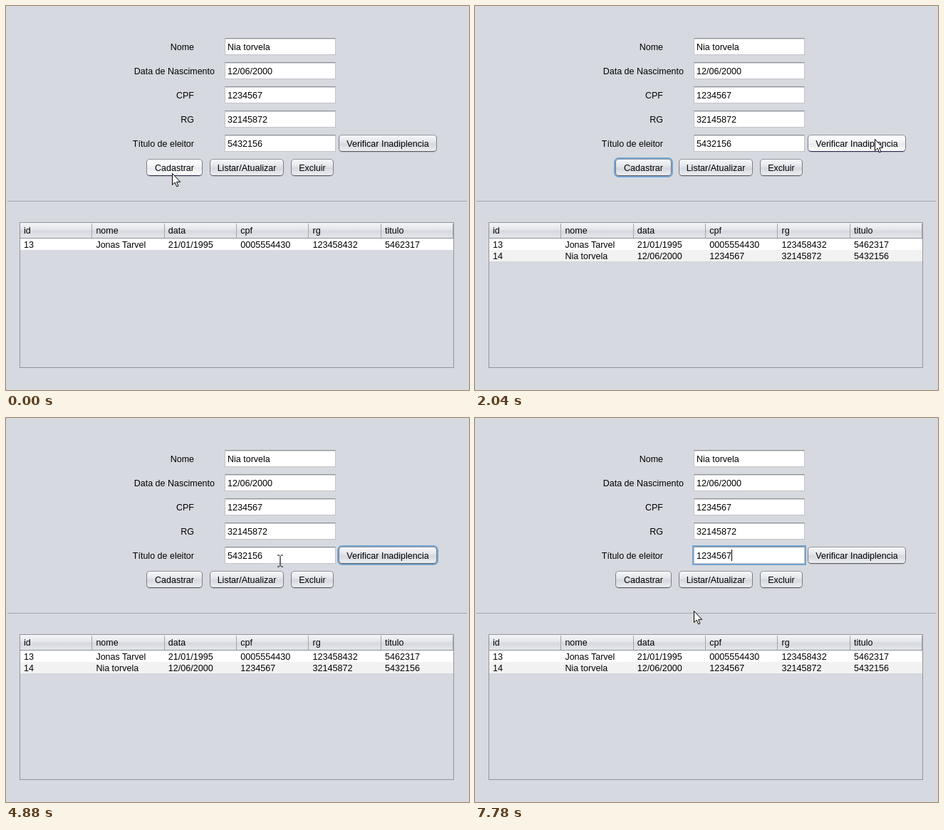
An HTML page for the animation above (8 s loop, 650 by 540 pixels).

```html
<!DOCTYPE html>
<html lang="pt">
<head>
<meta charset="utf-8">
<style>
html, body { margin: 0; width: 100%; height: 100%; overflow: hidden; background: #d6d9df; }
body { font: 12.5px/16px "Liberation Sans", Arial, sans-serif; color: #000; }
#stage { position: absolute; left: 0; top: 0; width: 650px; height: 540px; overflow: hidden; }
#stage div, svg { position: absolute; box-sizing: border-box; white-space: pre; }
.num { font-size: 12.6px; }
.right { text-align: right; }
.field { background: #fff; border: 1px solid #c0c3c9; border-top-color: #8d8f94; box-shadow: inset 0 1px #d8d9dc; }
.button {
  padding-top: 4px; text-align: center;
  border: 1px solid; border-color: #94979e #7b7e86 #5a5c63; border-radius: 5px;
  background: linear-gradient(#f7f8fa, #e2e4e9 45%, #d5d8de 55%, #eceef1);
  box-shadow: 0 1px #b9bcc3;
}
.hover { background: linear-gradient(#fff, #f1f2f5 45%, #e8eaee 55%, #fff); border-bottom-color: #2d2650; }
.ok { background: linear-gradient(#e3ebf3, #b5c6d8 45%, #9fb5cb 55%, #cfe0ee); border-color: #34506e #2b4561 #1d3450; }
.ok.hover { background: linear-gradient(#eef4f9, #c8d6e4 45%, #b4c8da 55%, #e0eef9); }
.ring { box-shadow: 0 0 0 2px #73a4d1; }
.line { background: #a2a5ad; }
.table { border: 1px solid #92959d; }
.head { background: linear-gradient(#f5f6f8, #e3e5ea 45%, #d6d9df 55%, #e4e6ea); border-bottom: 1px solid #8b8f97; }
.odd { background: #fff; }
.even { background: #f2f2f2; }
.dialog { background: #d6d9df; box-shadow: 0 0 0 1px #6d7076, 0 4px 16px 2px rgba(0,0,0,.28); }
.bar { background: #fff; }
.title { font: 11.5px/16px "Open Sans", "Noto Sans", sans-serif; }
.caret { background: #000; }
.sel { font-weight: normal; display: inline-block; height: 16px; background: #39698a; color: #fff; }
</style>
</head>
<body>
<div id="stage"></div>
<script>
const stage = document.getElementById('stage');

function box(x, y, w, h, cls = '', parent = stage) {
  const el = document.createElement('div');
  el.className = cls;
  el.style.cssText = `left:${x}px;top:${y}px;width:${w}px;height:${h}px`;
  parent.append(el);
  return el;
}
// y is the baseline
function label(x, y, text, cls = /\d/.test(text) ? 'num' : '', parent = stage) {
  const el = box(x, y - 12, 200, 16, cls, parent);
  el.textContent = text;
  return el;
}
function svg(x, y, size, body, parent = stage) {
  parent.insertAdjacentHTML('beforeend',
    `<svg style="left:${x}px;top:${y}px;overflow:visible" width="${size}" height="${size}">${body}</svg>`);
  return parent.lastElementChild;
}
function button(x, y, w, text, cls = '', parent = stage) {
  const el = box(x, y, w, 24, 'button ' + cls, parent);
  el.textContent = text;
  return el;
}

// Form
const person = ['Nia torvela', '12/06/2000', '1234567', '32145872', '5432156'];
const names = ['Nome', 'Data de Nascimento', 'CPF', 'RG', 'Título de eleitor'];
let field, value;
names.forEach((name, i) => {
  const y = 45 + 34 * i;
  label(i === 1 ? 93 : 64, y + 17, name, 'right');
  field = box(307, y, 156, 24, 'field');
  value = label(311, y + 17, person[i]);
});
const caret = box(0, 185, 1, 16, 'caret');
const verify = button(467, 181, 138, 'Verificar Inadiplencia');
const add = button(197, 215, 79, 'Cadastrar');
const others = [button(286, 215, 104, 'Listar/Atualizar'), button(400, 215, 60, 'Excluir')];
box(2, 274, 645, 1, 'line');

// Table
function row(y, h, cls, cells) {
  const el = box(20, y, 608, h, cls);
  cells.forEach((s, i) => label(5 + 101.4 * i, h === 16 ? 13 : 15, s, /\d/.test(s) ? 'num' : '', el));
  return el;
}
box(19, 304, 610, 205, 'table');
const head = row(305, 22, 'head', ['id', 'nome', 'data', 'cpf', 'rg', 'titulo']);
for (let i = 1; i <= 6; i++) box(Math.round(101.3 * i) - 1, 1, 1, 20, 'line', head);
row(327, 16, 'odd', ['13', 'Jonas Tarvel', '21/01/1995', '0005554430', '123458432', '5462317']);
const newRow = row(343, 16, 'even', ['14', ...person]);

// Message dialog
const dialog = box(193, 190, 262, 144, 'dialog');
box(0, 0, 262, 25, 'bar', dialog);
label(3, 16, 'Mensagem', 'title', dialog);
svg(242, 7, 10, '<path d="M0 0L10 10M10 0L0 10" stroke="#000" stroke-width="1.1"/>', dialog);
svg(15, 40, 46, `
  <defs><linearGradient id="blue" x2="0" y2="1">
    <stop stop-color="#4f86d2"/><stop offset=".5" stop-color="#2f62b8"/><stop offset="1" stop-color="#3f7ace"/>
  </linearGradient></defs>
  <circle cx="23" cy="23" r="22.5" fill="url(#blue)" stroke="#24509a"/>
  <circle cx="23" cy="11" r="3.2" fill="#fff"/>
  <path d="M16 18H26V33H31V37H15V33H20.5V21.5H16Z" fill="#fff"/>`, dialog);
const message = label(78, 67, '', 'num', dialog);
const ok = button(204, 103, 41, 'OK', 'num ok ring', dialog);

// Pointers
const arrow = svg(0, 0, 20, `<path d="M.5 .5V16.5L4.2 13.1L6.7 18.9L9 17.9L6.6 12.3H11.6Z"
  fill="#fff" stroke="#000"/>`);
const beam = svg(.5, .5, 1, `<path d="M-4 -8H-1M1 -8H4M0 -7.5V7.5M-4 8H-1M1 8H4"
  fill="none" stroke="#000" stroke-width="1.1"/>`);

const LOOP = 8000, STEP = 80;
const PRESS_VERIFY = 2110, PRESS_FIELD = 5200, DRAG_END = 5840, TYPE = 6900, KEY_GAP = 146;
const messages = [[250, 1360, 'Inserido com sucesso.'], [2440, 4300, 'Inadiplente!']];

// Pointer moves: start, end, destination
const moves = [
  [330, 560, 249, 287], [700, 1120, 415, 304], [1400, 1630, 450, 233], [1630, 2000, 561, 187],
  [2440, 2800, 433, 295], [2950, 3190, 425, 300], [3190, 3600, 255, 260], [3600, 3850, 290, 314],
  [3850, 4200, 412, 303], [4330, 4700, 384, 200], [PRESS_FIELD, DRAG_END, 155, 204],
  [DRAG_END, 6260, 250, 313], [6260, 6480, 307, 271],
];

const clamp = (v, a = 0, b = 1) => Math.min(b, Math.max(a, v));
const ease = k => k * k * (3 - 2 * k);
const show = (el, on) => el.style.visibility = on ? 'visible' : 'hidden';
const place = (el, x, y) => el.style.transform = `translate(${x}px,${y}px)`;

function inside(el, x, y) {
  const r = el.getBoundingClientRect();
  return x >= r.left && x < r.right && y >= r.top && y < r.bottom;
}

function pointer(t) {
  let x = 233, y = 235;
  for (const [from, to, toX, toY] of moves) {
    const k = ease(clamp((t - from) / (to - from)));
    x += (toX - x) * k;
    y += (toY - y) * k;
  }
  return [Math.round(x), Math.round(y)];
}

function drawDialog(t, open) {
  const alpha = open ? clamp((t - open[0]) / 160) * clamp((open[1] + 120 - t) / 120) : 0;
  show(dialog, alpha > 0);
  dialog.style.opacity = alpha;
  dialog.style.transform = `scale(${.92 + .08 * alpha})`;
  if (open) message.textContent = open[2];
}

function drawField(t, x) {
  const editing = t >= PRESS_FIELD;
  const typed = clamp(1 + Math.floor((t - TYPE) / KEY_GAP), 0, 7);
  const digits = typed ? '1234567'.slice(0, typed) : person[4];
  let start = digits.length;
  if (editing && !typed) start = t >= DRAG_END ? 0 : clamp(Math.round((x - 311) / 7), 0, start);
  const selected = digits.slice(start);
  value.innerHTML = digits.slice(0, start) + (selected && `<b class="sel">${selected}</b>`);
  field.classList.toggle('ring', editing);
  show(caret, editing && start > 0);
  caret.style.left = 311 + 7 * start + 'px';
}

function draw(now) {
  const t = Math.floor(now / STEP) * STEP;
  const [x, y] = pointer(t);
  const open = messages.find(m => t >= m[0] && t < m[1] + 120);
  drawDialog(t, open);
  drawField(now, x);
  show(newRow, t >= 1460);

  for (const b of [verify, add, ...others]) b.classList.toggle('hover', !open && inside(b, x, y));
  ok.classList.toggle('hover', inside(ok, x, y));
  add.classList.toggle('ring', !open && now >= 90 && now < PRESS_VERIFY);
  verify.classList.toggle('ring', !open && now >= PRESS_VERIFY && now < PRESS_FIELD);

  const dragging = t >= PRESS_FIELD && t < 6000;
  const isBeam = dragging || !open && inside(field, x, y);
  show(beam, isBeam);
  show(arrow, !isBeam);
  place(arrow, x, y);
  place(beam, x, y);
}

const began = performance.now();
function tick() {
  draw((performance.now() - began) % LOOP);
  requestAnimationFrame(tick);
}
tick();
</script>
</body>
</html>
```
